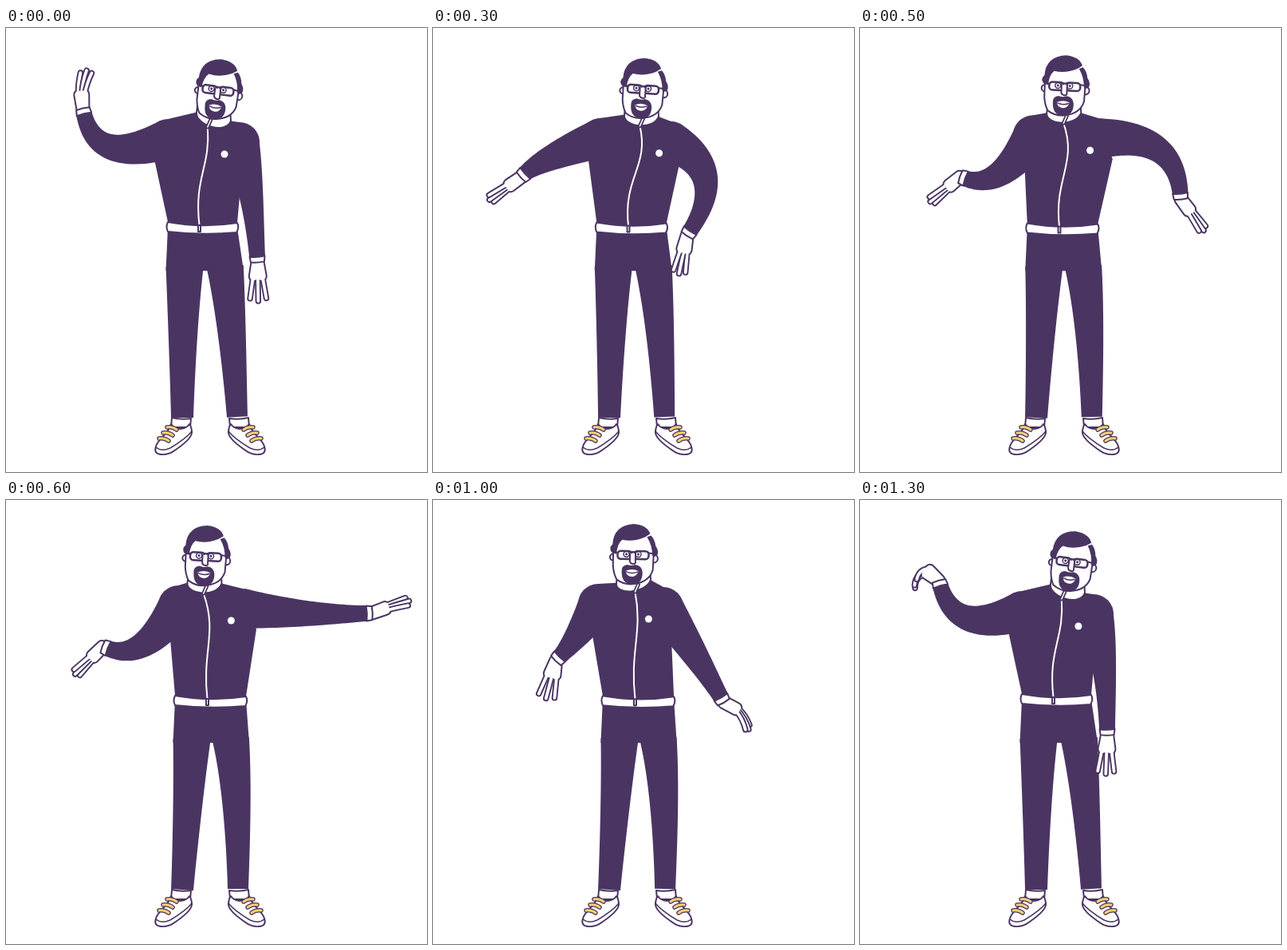
An HTML page with a canvas that plays this animation: 528 by 556 pixels, repeating every 1.4 s.

```html
<!DOCTYPE html>
<html lang="en">
<head>
<meta charset="utf-8">
<title>Dancing man</title>
<style>
html, body { margin: 0; height: 100%; overflow: hidden; background: #fff; }
canvas { display: block; }
</style>
</head>
<body>
<canvas id="stage" width="528" height="556"></canvas>
<script>
const ctx = document.getElementById('stage').getContext('2d');
const INK = '#4a3562', PAPER = '#fff', LACE = '#f8cf72';
const STEP = 100, STEPS = 14, RAD = Math.PI / 180;

// head: x, y, tilt; stance: hip sway; shoulders: left x, right x
// arm: elbow, wrist and hand (bend, finger fan, finger curl)
const arm = (elbow, wrist, hand) => ({ elbow, wrist, hand });
const hanging = arm([305, 200], [310, 287], [3, 1, 0]);
const rest = { head: [266, 78, 7], stance: 0, shoulders: [203, 293] };
const poses = [
  { ...rest, at: 0, arms: [arm([132, 149], [98, 108], [8, .7, 25]), arm([306, 200], [315, 286], [3, 1, 0])] },
  { ...rest, at: 2, head: [264, 78, 5], arms: [arm([133, 131], [111, 159], [66, .5, 0]), hanging] },
  { at: 4, head: [263, 75.5, 2], stance: .5, shoulders: [218, 303],
    arms: [arm([178, 184], [137, 191], [-52, .5, 0]), arm([369, 160], [341, 200], [-46, .5, 0])] },
  { at: 6, head: [250.5, 71, 3], stance: 1, shoulders: [216, 297],
    arms: [arm([172, 181], [128, 186], [-66, .5, 0]), arm([376, 142], [452, 142], [-18, .5, 5])] },
  { at: 8, head: [256, 72.5, 3], stance: 1, shoulders: [216, 300],
    arms: [arm([171, 180], [128, 183], [-58, .5, 0]), arm([373, 141], [436, 134], [33, .7, 115])] },
  { at: 10, head: [251, 69, 1], stance: 1.1, shoulders: [207, 289],
    arms: [arm([182, 168], [159, 196], [-29, 1, 0]), arm([330, 196], [361, 247], [-32, .4, 45])] },
  { ...rest, at: 13, arms: [arm([136, 148], [101, 108], [-34, .8, -125]), hanging] }
];
poses.push({ ...poses[0], at: STEPS });

const lerp = (a, b, u) => a + (b - a) * u;
const mix = (a, b, u) => a.map((v, i) => lerp(v, b[i], u));
const neckOf = ([x, y, tilt]) => [x + 2 - tilt, y + 33];
const shoulderOf = (p, side) => [p.shoulders[side], neckOf(p.head)[1] + 28 + side * 4];

// Swings a bone from one pose to the next, returning its far end
function swing(root, from, a, to, b, u) {
  const ax = a[0] - from[0], ay = a[1] - from[1], bx = b[0] - to[0], by = b[1] - to[1];
  const turn = Math.atan2(ax * by - ay * bx, ax * bx + ay * by);
  const angle = Math.atan2(ay, ax) + turn * u;
  const len = lerp(Math.hypot(ax, ay), Math.hypot(bx, by), u);
  return [root[0] + len * Math.cos(angle), root[1] + len * Math.sin(angle)];
}

function poseAt(n) {
  const i = poses.findIndex(p => p.at > n), a = poses[i - 1], b = poses[i];
  const u = (n - a.at) / (b.at - a.at);
  const pose = {
    head: mix(a.head, b.head, u),
    stance: lerp(a.stance, b.stance, u),
    shoulders: mix(a.shoulders, b.shoulders, u)
  };
  pose.arms = a.arms.map((p, side) => {
    const q = b.arms[side], shoulder = shoulderOf(pose, side);
    const elbow = swing(shoulder, shoulderOf(a, side), p.elbow, shoulderOf(b, side), q.elbow, u);
    const wrist = swing(elbow, p.elbow, p.wrist, q.elbow, q.wrist, u);
    return { shoulder, elbow, wrist, hand: mix(p.hand, q.hand, u) };
  });
  return pose;
}

function fill(path, color = INK) {
  ctx.fillStyle = color;
  ctx.fill(path);
}
function line(path, width = 2, color = INK) {
  ctx.lineWidth = width;
  ctx.strokeStyle = color;
  ctx.stroke(path);
}
function shape(path) {
  fill(path, PAPER);
  line(path);
}
const svg = d => new Path2D(d);
function disc(x, y, r) {
  const p = new Path2D();
  p.arc(x, y, r, 0, 7);
  return p;
}
function at(x, y, angle, paint) {
  ctx.save();
  ctx.translate(x, y);
  ctx.rotate(angle);
  paint();
  ctx.restore();
}

// Control point of the curve that passes through b halfway
const bendOf = (a, b, c) => a.map((v, i) => 2 * b[i] - (v + c[i]) / 2);

// Tapered limb through three joints; widths are half widths
function limb(a, b, c, wide, thin, taper) {
  const m = bendOf(a, b, c), near = [], far = [];
  for (let i = 0; i <= 30; i++) {
    const t = i / 30, s = 1 - t;
    const [x, y] = a.map((v, j) => s * s * v + 2 * s * t * m[j] + t * t * c[j]);
    const [dx, dy] = a.map((v, j) => s * (m[j] - v) + t * (c[j] - m[j]));
    const w = (thin + (wide - thin) * s ** taper) / Math.hypot(dx, dy);
    near.push([x - dy * w, y + dx * w]);
    far.unshift([x + dy * w, y - dx * w]);
  }
  fill(svg('M' + near.concat(far).join('L') + 'Z'));
}

function drawShoe() {
  shape(svg('M208 488Q220 491 232 489L231 500H207Z'));
  shape(svg('M207 496C204 508 190 515 188 524Q185 533 194 534Q204 535 213 528Q232 515 233 507Q233 500 230 496Q227 501 219 502Q211 502 207 496Z'));
  line(svg('M188 525Q195 531 206 526Q226 514 233 505'), 1.5);
  for (let i = 0; i < 3; i++) {
    const lace = svg(`M${202 - i * 5} ${500 + i * 7}q7 -1 12 3`);
    line(lace, 5.5);
    line(lace, 3, LACE);
  }
}

function drawLegs(k) {
  drawShoe();
  ctx.save();
  ctx.transform(-1, 0, 0, 1, 512, 0);
  drawShoe();
  ctx.restore();
  const l = 224 + 9 * k, r = 275 + 7 * k;
  limb([l, 300], [222 + 6 * k, 380], [221, 488], 23.5, 14, 1.1);
  limb([r, 300], [283 + 6 * k, 380], [290 + k, 487], 23, 13, 1.1);
  fill(svg(`M${203 + 9 * k} 250L${l - 23.5} 304H${r + 23}L${290 + 11 * k} 250Z`));
}

function drawHand([bend, fan, curl]) {
  at(7, 0, bend * RAD, () => {
    const palm = svg(`M0 0L17 0M0 -2L18 ${-5 * fan}M0 2L18 ${5 * fan}`);
    line(palm, 14);
    for (let i = -1; i <= 1; i++) {
      const turn = curl * RAD, splay = i * 9 * fan * RAD, len = 15 - Math.abs(i) * 1.5;
      const bx = 19, by = i * 6 * fan;
      const kx = bx + len * Math.cos(turn * .4 + splay), ky = by + len * Math.sin(turn * .4 + splay);
      const tx = kx + len * Math.cos(turn + splay), ty = ky + len * Math.sin(turn + splay);
      const finger = svg(`M${bx} ${by}Q${kx} ${ky} ${tx} ${ty}`);
      line(finger, 7.5);
      line(finger, 3.7, PAPER);
    }
    line(palm, 10, PAPER);
  });
  shape(svg('M0 -9.5Q1.5 0 0 9.5L7 8.5Q8.5 0 7 -8.5Z'));
}

function drawArm({ shoulder, elbow, wrist, hand }) {
  const m = bendOf(shoulder, elbow, wrist);
  at(...wrist, Math.atan2(wrist[1] - m[1], wrist[0] - m[0]), () => drawHand(hand));
  fill(disc(...shoulder, 25));
  limb(shoulder, elbow, wrist, 25, 10, 1.3);
}

function drawJacket({ head, stance, arms }) {
  const [nx, ny] = neckOf(head), tilt = head[2], lean = (tilt - 2.5) * 1.2;
  const [reachL, reachR] = arms.map(({ shoulder: s, elbow: e }) => (e[0] - s[0]) / Math.hypot(e[0] - s[0], e[1] - s[1]));
  const [sl, sr] = arms.map(a => a.shoulder);
  const l = 203 + 9 * stance, r = 290 + 11 * stance, y = 243 + 2 * stance, mid = (l + r) / 2;
  const hemTop = `${l} ${y}Q${mid} ${y + 8} ${r} ${y + 1}`;

  fill(svg(`M${nx - 22} ${ny - lean}L${sl[0]} ${sl[1] - 25}L${sl[0] + 17 * reachL} ${sl[1] + 26}L${hemTop}`
    + `L${sr[0] + 17 * reachR} ${sr[1] + 26}L${sr[0]} ${sr[1] - 25}L${nx + 21} ${ny + lean}Z`));
  shape(svg(`M${hemTop}q3 6 -1 12Q${mid} ${y + 17} ${l} ${y + 12}q-3 -6 0 -12Z`));

  const zx = nx + 3 - tilt * 1.6, zy = ny + 13, ex = mid - 4, ey = y + 4;
  line(svg(`M${zx} ${zy}C${zx + 18 * reachR} ${zy + 50} ${ex - 7} ${ey - 60} ${ex} ${ey}`), 2, PAPER);
  shape(svg(`M${ex - 1.5} ${ey}h3v8h-3z`));
  fill(disc(nx + 12 + 21 * reachR ** 2, ny + 47, 4.5), PAPER);

  const rim = `M${nx - 21} ${ny - lean - 8}l-1 8C${nx - 24} ${ny + 15 - lean} ${nx + 14} ${ny + 18 + lean} ${nx + 21} ${ny + lean}l-1 -16`;
  fill(svg(rim), PAPER);
  line(svg(rim));
  const tab = svg(`M${zx} ${zy}l4 -9`);
  line(tab, 5);
  line(tab, 1.5, PAPER);
}

function drawHead() {
  shape(disc(-25, 3, 4));
  shape(disc(26, 4, 5));
  const jaw = 'M-25 -10V14Q-24 24 -20 31Q-10 38 2 36Q21 33 25 18L26 -10';
  fill(svg(jaw + 'L20 -27H-18Z'), PAPER);
  line(svg(jaw));
  fill(svg('M-21 -1L-27 -3Q-31 -9 -26 -13Q-25 -37 0 -39Q17 -38 21 -27L15 -23Q0 -16 -14 -19Q-20 -14 -21 -1Z'));
  fill(svg('M17 -23L22 -25Q27 -20 28 -12Q33 -5 30 0Q26 3 24 0Q24 -12 17 -23Z'));
  fill(svg('M-14 21Q-15 13 -7 12Q-2 14 3 12Q11 13 12 21Q13 36 -1 37Q-14 36 -14 21Z'));
  fill(svg('M-9 20Q-1 16 7 20Q5 27 -1 27Q-8 27 -9 20Z'), PAPER);
  line(svg('M-8 21Q-1 24 6 21'), 1.5);
  for (const side of [-1, 1]) {
    const lens = new Path2D();
    lens.roundRect(side * 10.5 - 9, -5, 18, 10, 4);
    fill(lens, PAPER);
    line(lens, 2.5);
    line(disc(side * 7.5 - 1, -1, 3.5), 1.5);
    fill(disc(side * 7.5 - 1, -1, 1.5));
  }
  shape(svg('M-4 -2V8Q-3 11 0 11Q4 11 3 8V-2'));
  line(svg('M-19 -3H-25M19 -3L26 -2M-4 -4H3'));
}

function draw(n) {
  const pose = poseAt(n), [x, y, tilt] = pose.head;
  fill(svg('M0 0H528V556H0Z'), PAPER);
  drawLegs(pose.stance);
  pose.arms.forEach(drawArm);
  drawJacket(pose);
  at(x, y, tilt * RAD, drawHead);
}

ctx.lineJoin = ctx.lineCap = 'round';
const start = performance.now();
function tick() {
  draw(Math.floor((performance.now() - start) / STEP) % STEPS);
  requestAnimationFrame(tick);
}
tick();
</script>
</body>
</html>
```
